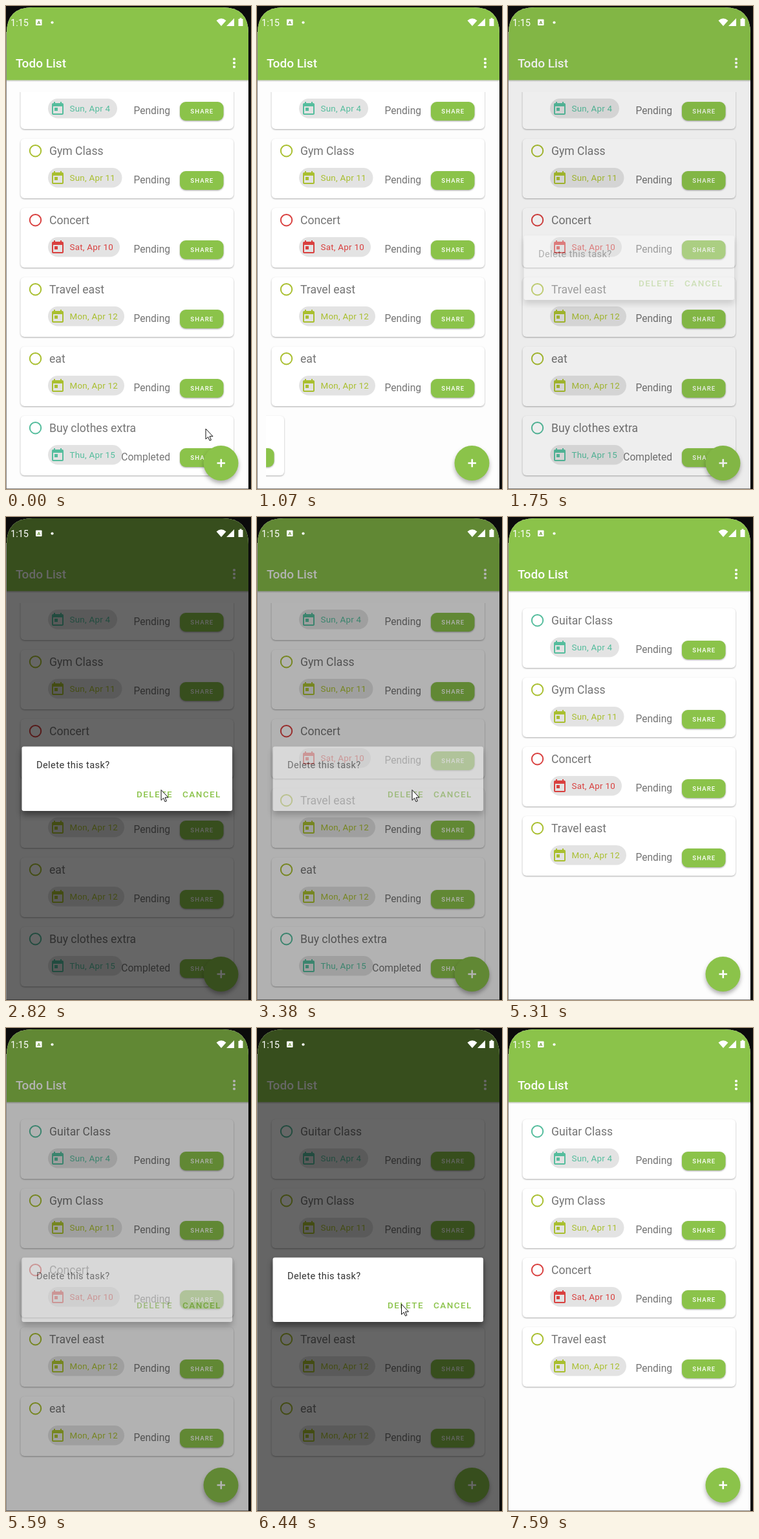
An HTML page that plays this animation: 379 by 746 pixels, repeating every 8.02 s.

```html
<!DOCTYPE html>
<html lang="en">
<head>
<meta charset="utf-8">
<title>Todo List</title>
<style>
html, body { margin: 0; height: 100%; overflow: hidden; background: #0b0b0b; }
svg { display: block; width: 100vw; height: 100vh; font-family: Roboto, sans-serif; }
.card { fill: #fff; filter: drop-shadow(0 1.5px 1.3px rgba(0,0,0,.32)); }
.btn { fill: #8bc34a; filter: drop-shadow(0 1px 1px rgba(0,0,0,.35)); }
.fab { fill: #8bc34a; filter: drop-shadow(0 4px 3px rgba(0,0,0,.3)); }
.name { font-size: 17.6px; fill: #757575; }
.status { font-size: 15.6px; fill: #757575; text-anchor: end; }
.date { font-size: 13.4px; letter-spacing: .25px; }
.share { font-size: 9.6px; font-weight: 500; letter-spacing: 1.1px; fill: #fff; }
.panel { fill: #fff; filter: drop-shadow(0 6px 5px rgba(0,0,0,.42)); }
.ask { font-size: 14.6px; letter-spacing: .4px; fill: #333; }
.act { font-size: 13.5px; font-weight: 500; letter-spacing: 1.45px; fill: #8bc34a; }
</style>
</head>
<body>
<svg viewBox="0 0 379 746" preserveAspectRatio="none">
  <defs>
    <clipPath id="screen"><path d="M1 746V42Q1 2 41 2H335Q375 2 375 42V746Z"/></clipPath>
    <clipPath id="list"><rect x="14" y="133" width="346" height="613"/></clipPath>
    <linearGradient id="edge" x2="0" y2="1">
      <stop stop-color="#000" stop-opacity=".2"/><stop offset="1" stop-color="#000" stop-opacity="0"/>
    </linearGradient>
  </defs>
  <path d="M.5 40V745.5H375" fill="none" stroke="#8a8a8a"/>
  <g clip-path="url(#screen)">
    <rect x="1" width="374" height="745" fill="#fdfdfd"/>
    <g clip-path="url(#list)"><g id="items"></g></g>
    <rect x="1" width="374" height="114.5" fill="#8bc34a"/>
    <rect x="1" y="114.5" width="374" height="3" fill="url(#edge)"/>
    <text x="15" y="95.300" font-size="19" font-weight="500" fill="#fff">Todo List</text>
    <g fill="#fff"><circle cx="353" cy="82" r="2.100"/><circle cx="353" cy="88" r="2.100"/><circle cx="353" cy="94" r="2.100"/></g>
    <circle class="fab" cx="332.500" cy="706" r="27"/>
    <path d="M326.500 706h12.500M332.750 699.750v12.500" stroke="#fff" stroke-width="2.600"/>
    <rect id="scrim" width="379" height="746"/>
    <g fill="#fff">
      <text x="7" y="31" font-size="14.500">1:15</text>
      <rect x="46" y="20.500" width="9.500" height="9.500" rx="1"/>
      <text x="50.750" y="28" font-size="7.500" font-weight="700" text-anchor="middle" fill="#6c9a38">A</text>
      <circle cx="71.500" cy="25.500" r="2.100"/>
      <path d="M325.500 22.500Q333 16 340.500 22.500L333 31ZM353 19V31H341Z"/>
      <path d="M361.500 18.500h3v1.500h2V31h-7V20h2Z"/>
    </g>
    <g id="dialog">
      <rect class="panel" x="24.500" y="354.500" width="325.500" height="99.500" rx="3"/>
      <text class="ask" x="47" y="388">Delete this task?</text>
      <text class="act" x="202" y="432.500">DELETE</text>
      <text class="act" x="273" y="432.500">CANCEL</text>
    </g>
    <path id="cursor" d="M0 0V16L3.600 12.600 6 18.200 8.400 17.200 6 11.700H11Z" fill="#fff" stroke="#111"/>
  </g>
</svg>
<script>
const $ = id => document.getElementById(id);
const TEAL = '#55bd9d', LIME = '#a9bf2f', RED = '#d9403f';
const tasks = [
  ['Guitar Class', 'Sun, Apr 4', 107, TEAL],
  ['Gym Class', 'Sun, Apr 11', 114.5, LIME],
  ['Concert', 'Sat, Apr 10', 111, RED],
  ['Travel east', 'Mon, Apr 12', 118, LIME],
  ['eat', 'Mon, Apr 12', 118, LIME],
  ['Buy clothes extra', 'Thu, Apr 15', 115, TEAL, 'Completed']
];
const calendar = 'M19 3h-1V1h-2v2H8V1H6v2H5c-1.1 0-2 .9-2 2v14c0 1.100.9 2 2 2h14c1.100 0 2-.9 2-2V5c0-1.100-.9-2-2-2zm0 16H5V8h14zM7 10h5v5H7z';

$('items').innerHTML = tasks.map(([name, date, width, color, status = 'Pending'], i) => `
  <g transform="translate(0 ${141 + 107 * i})"><g id="task${i}">
    <rect class="card" x="22.500" width="329.500" height="92" rx="6"/>
    <circle cx="45.500" cy="18.700" r="8.700" fill="none" stroke="${color}" stroke-width="2"/>
    <text class="name" x="67" y="25">${name}</text>
    <rect x="65" y="45" width="${width}" height="30.500" rx="15.250" fill="#e3e3e3"/>
    <path transform="translate(68 49)" d="${calendar}" fill="${color}"/>
    <text class="date" x="98.500" y="65" fill="${color}">${date}</text>
    <text class="status" x="254" y="69">${status}</text>
    <rect class="btn" x="269" y="50" width="67.500" height="29" rx="9"/>
    <text class="share" x="285.300" y="68">SHARE</text>
  </g></g>`).join('');

// The picture is refreshed only at these moments: [first, last, count]
const ticks = [
  [0, 0, 1], [650, 1070, 4], [1350, 1350, 1], [1630, 1750, 2], [1870, 2020, 2], [2300, 2820, 4],
  [3380, 4370, 8], [4490, 4490, 1], [4890, 5310, 4], [5590, 5740, 2], [6020, 6440, 4], [6810, 7590, 7]
].flatMap(([a, b, n]) => Array.from({length: n}, (_, i) => n > 1 ? a + (b - a) * i / (n - 1) : a));

// Tracks of [time, value, ...]
const fade = [[1600, 0, 0], [1750, .065, .33], [1870, .4, .8], [2020, .6, 1], [3240, .6, 1], [3520, 0, 0],
  [5440, 0, 0], [5740, .6, 1], [6670, .6, 1], [6940, 0, 0]];
const scroll = [[3660, -43], [3950, 0]];
const removal = {
  5: {swipe: [[510, 0], [1070, -310], [1350, -400], [1351, 0]], alpha: [[3520, 1], [3810, 0]]},
  4: {swipe: [[4750, 0], [5170, -307], [5310, -400], [5311, 0]], alpha: [[6940, 1], [7200, 0]]}
};
const pointer = [[0, 309, 653], [650, 309, 653], [2300, 104, 518], [2820, 240, 421.5], [3520, 240, 421.5],
  [3950, 240, 479.5], [4370, 299, 592], [4490, 308, 592.5], [6020, 168, 456], [6440, 223.5, 426.5],
  [6940, 223.5, 426.5], [7460, 197, 601]];
const shown = [[0, 650], [2300, 4890], [6020, 7590]];

function at(track, t) {
  const i = track.findIndex(key => key[0] > t);
  if (i < 1) return (i ? track[track.length - 1] : track[0]).slice(1);
  const a = track[i - 1], b = track[i], k = (t - a[0]) / (b[0] - a[0]);
  return a.slice(1).map((v, j) => v + (b[j + 1] - v) * k);
}

function draw(now) {
  const time = now % 8020;
  const t = ticks.filter(x => x <= time).pop();
  const [dim, alpha] = at(fade, t);
  $('scrim').setAttribute('opacity', dim);
  $('dialog').setAttribute('opacity', alpha);
  $('items').setAttribute('transform', `translate(0 ${at(scroll, t)})`);
  for (const i in removal) {
    $('task' + i).setAttribute('transform', `translate(${at(removal[i].swipe, t)} 0)`);
    $('task' + i).setAttribute('opacity', at(removal[i].alpha, t));
  }
  $('cursor').setAttribute('transform', `translate(${at(pointer, t).join(' ')})`);
  $('cursor').setAttribute('opacity', shown.some(([a, b]) => t >= a && t < b) ? 1 : 0);
}

const start = performance.now();
function loop() {
  draw(performance.now() - start);
  requestAnimationFrame(loop);
}
loop();
</script>
</body>
</html>
```
